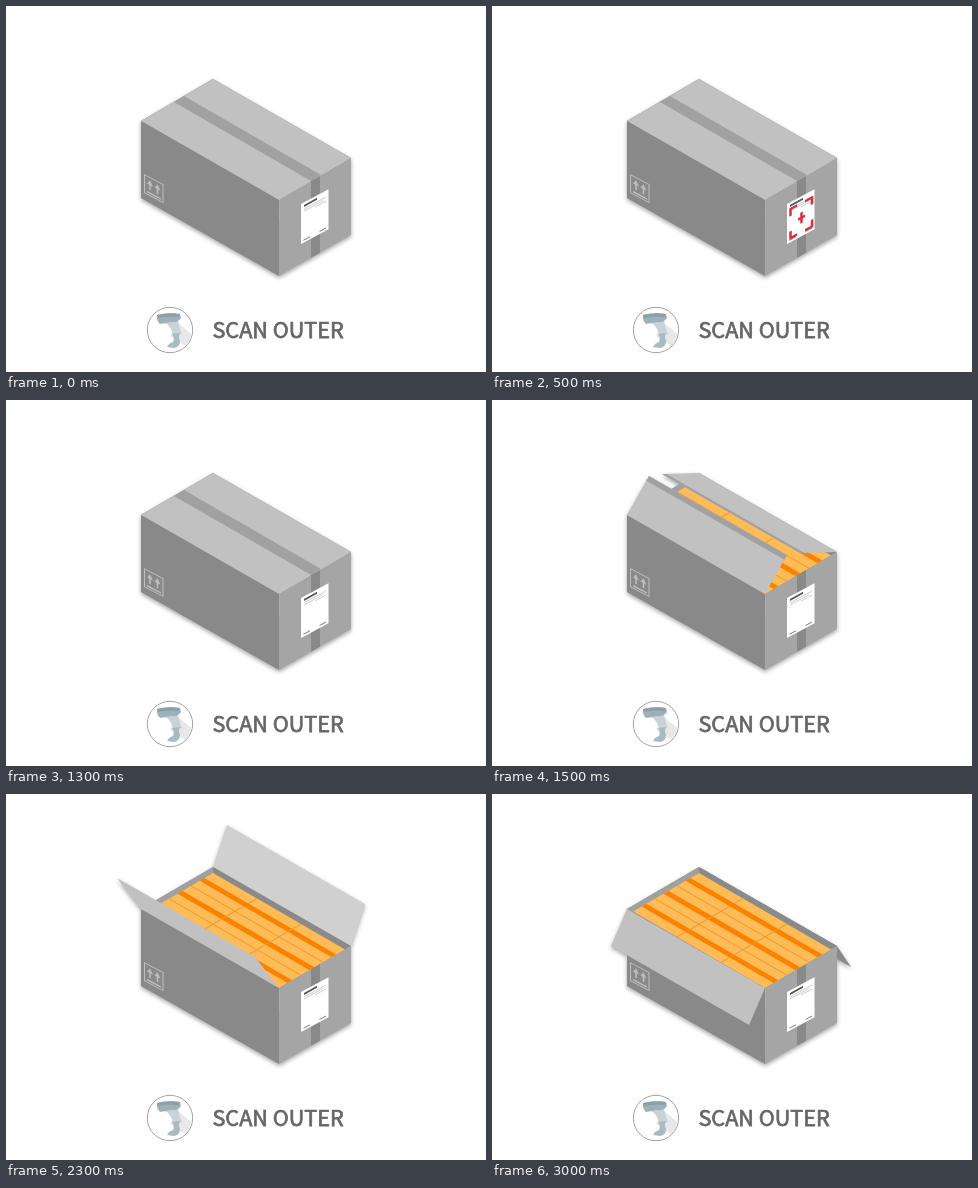
Animation of 480 by 366 pixels, one loop 3.5 s. Source, as an HTML page:

```html
<!DOCTYPE html>
<html lang="en">
<head>
<meta charset="utf-8">
<title>Scan outer</title>
<style>
  html, body { margin: 0; height: 100%; overflow: hidden; background: #fff; }
  svg { display: block; width: 100vw; height: 100vh; }
  .carton { filter: drop-shadow(0 2px 2px rgba(0, 0, 0, .35)); }
  text {
    font: 500 21.6px "Noto Sans CJK JP", "Noto Sans CJK SC", "Noto Sans", sans-serif;
    fill: #666; stroke: #666; stroke-width: .75px;
  }
</style>
</head>
<body>
<svg viewBox="0 0 480 366">
  <g class="carton">
    <g id="farBehind"></g>
    <path fill="#8a8a8a" d="M207 73L135 115 273 194 345 152z"/>
    <path fill="#a0a0a0" d="M207 73L135 115 141 118 207 79z"/>
    <g id="contents"></g>
    <g id="farFront"></g>
    <g id="lid">
      <path fill="#c1c1c1" d="M207 73L135 115 273 194 345 152z"/>
      <path fill="#a1a1a1" d="M168 96L178 90 315 169 305 175z"/>
    </g>
    <path fill="#898989" d="M135 115L273 194V270L135 192z"/>
    <path fill="#a5a5a5" d="M273 194L345 152V229L273 270z"/>
    <path fill="#898989" d="M305 175.3L314 170V246.7L305 251.8z"/>
    <path stroke="#e8a548" d="M273.5 195V216"/>
    <g transform="matrix(1 .53 0 1 138 168)" fill="none" stroke="#bdbdbd">
      <path d="M.5 .5H19V18.5H.5z"/>
      <path stroke-width="1.6" d="M6 5V13M13.5 5V13M3 16H17"/>
      <path fill="#bdbdbd" stroke="none" d="M6 3L9 8H3zM13.5 3L16.5 8H10.5z"/>
    </g>
    <g id="near"></g>
  </g>

  <g transform="matrix(1 -.54 0 1 295 198)">
    <path fill="#fff" d="M0 0H27.5V40H0z"/>
    <path stroke="#555" stroke-width="2" d="M3 3.5H16"/>
    <path stroke="#ccc" d="M3 6.5H25M3 8.5H22M14 10.5H25"/>
    <path stroke="#777" d="M2.5 37.5H9M18.5 37.5H25"/>
    <g id="scan" fill="none" stroke="#dc2d3d" stroke-width="2.5">
      <path d="M3.5 14V7H10M18 7H25V14M25 29V36H18M10 36H3.5V29"/>
      <path d="M14.5 16V27M11 21.5H18"/>
    </g>
  </g>

  <circle cx="164" cy="324" r="22.7" fill="#fff" stroke="#a3a3a3"/>
  <path fill="#e6e8e9" d="M172 317L185.5 328A22.5 22.5 0 0 1 179 340L164 330z"/>
  <path fill="#c9d3d7" d="M154 316L172 314Q173 322 176 328L167 330Q166 322 161 318z"/>
  <path fill="#9fb1b8" d="M151 309Q162 306 174 308L175 312Q172 317 165 316L154 318Q150 314 151 309z"/>
  <path fill="#8ba0a8" d="M151 309Q162 306 174 308L173 311Q162 310 152 312z"/>
  <path fill="#a9bac0" d="M166 328L174 327Q172 331 174 335 174 341 168 342L161 341Q163 337 167 336 169 332 166 328z"/>
  <text x="206.5" y="332">SCAN OUTER</text>
</svg>
<script>
const $ = id => document.getElementById(id);
const STEP = 500;

// Each flap is its hinge swept by the offset [dx, dy] of its free edge.
const poses = [
  {}, { scan: true }, {},
  { near: [22, -39, '#c1c1c1', '#a1a1a1'], farFront: [-37, 1, '#c1c1c1', '#a1a1a1'] },
  { near: [-24, -31, '#c1c1c1'], farBehind: [14, -42, '#d0d0d0'] },
  { near: [-35, 21, '#d0d0d0'], farBehind: [32, -18, '#d0d0d0'] },
  { near: [-16, 37, '#c1c1c1'], farBehind: [14, 21, '#8a8a8a'] }
];
const hinges = { near: [135, 115], farBehind: [207, 73], farFront: [207, 73] };

// u runs across the carton from its near side, v along it.
const at = (u, v) => `${141 + 66 * u + 132 * v} ${117.5 - 38.5 * u + 76.5 * v}`;
const quad = (u0, u1, v0, v1, fill) =>
  `<path fill="${fill}" d="M${at(u0, v0)}L${at(u1, v0)} ${at(u1, v1)} ${at(u0, v1)}z"/>`;

let packs = quad(0, 1, 0, 1, '#ffbb55');
for (let i = 0; i < 3; i++) {
  const mid = (i + .5) / 3, edge = i / 3;
  packs += quad(mid - .036, mid + .036, 0, 1, '#fa8200');
  if (i) {
    packs += quad(edge - .007, edge + .007, 0, 1, '#e89a32');
    packs += quad(0, 1, edge - .004, edge + .004, '#e89a32');
  }
}
$('contents').innerHTML = packs;

const sweep = (x, y, dx, dy, fill) =>
  `<path fill="${fill}" d="M${x} ${y}l${dx} ${dy} 138 79 ${-dx} ${-dy}z"/>`;

function flapShape([x, y], [dx, dy, fill, tape]) {
  const inner = .88;
  const strip = tape
    ? sweep(x + dx * inner, y + dy * inner, dx * (1 - inner), dy * (1 - inner), tape)
    : '';
  return sweep(x, y, dx, dy, fill) + strip;
}

function show(pose) {
  for (const id in hinges) {
    $(id).innerHTML = pose[id] ? flapShape(hinges[id], pose[id]) : '';
  }
  $('lid').style.display = pose.near ? 'none' : '';
  $('scan').style.display = pose.scan ? '' : 'none';
}

function tick() {
  show(poses[Math.floor(performance.now() / STEP) % poses.length]);
  requestAnimationFrame(tick);
}
tick();
</script>
</body>
</html>
```
